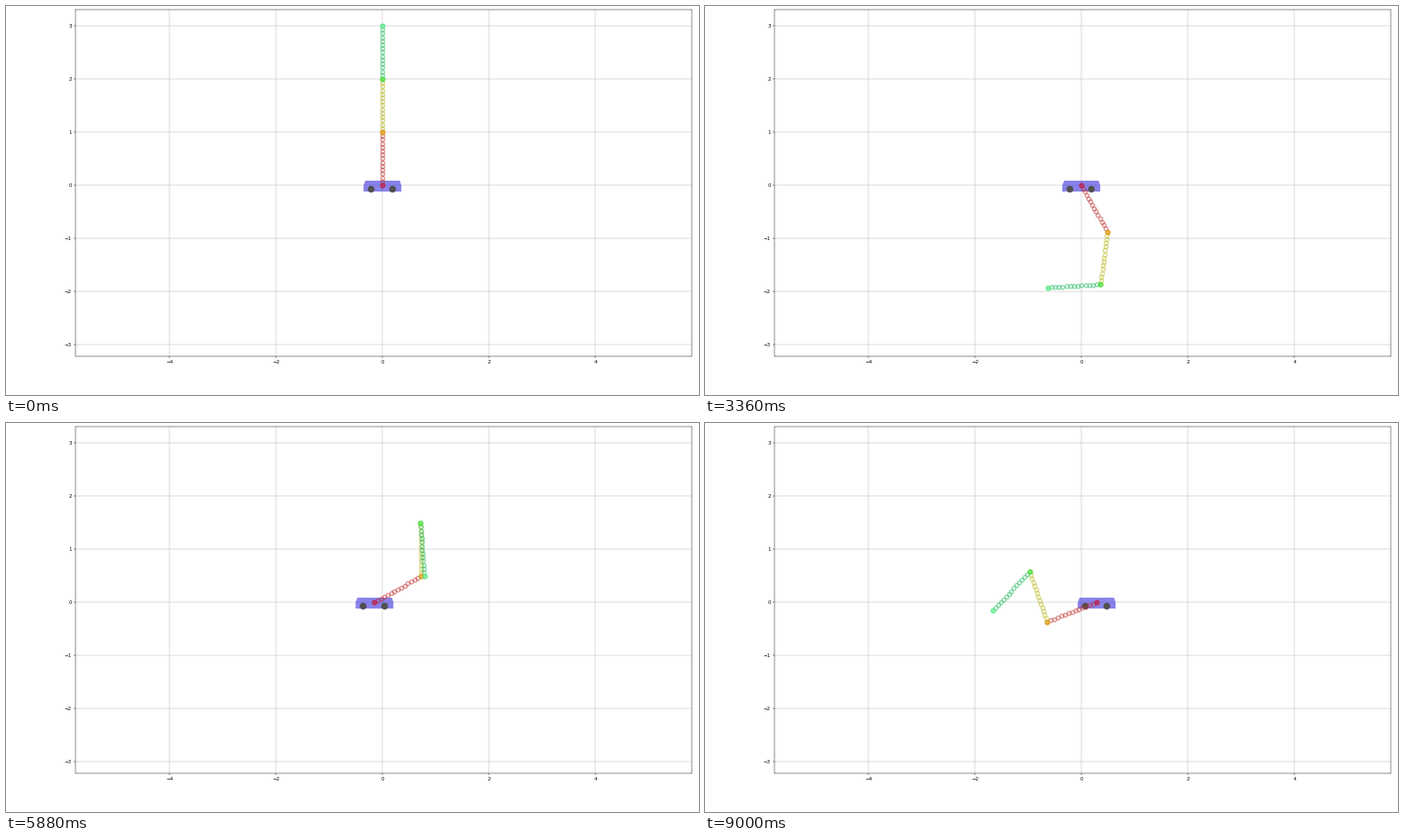
These frames come from a looping animation (768x432 px, 9030 ms). A matplotlib script:

```python
import numpy as np
import matplotlib.pyplot as plt
from matplotlib.animation import FuncAnimation
from matplotlib.patches import Circle, Polygon

FRAMES, STEP = 301, 30      # frame count, ms per frame
SCALE = 59.02               # pixels per unit
ORIGIN = 417.2, 199.0       # stage position of (0, 0) in pixels
PX = 72 / 40                # points per pixel
BEADS = 15                  # rings per link
MASS, DRIFT = 13, 0.003     # cart mass in bobs, slow drift of the whole

# turning points of the swing: seconds, then link angles in degrees
# clockwise from upright
TIMES, *ANGLES = np.transpose([
    (0, 0, 0, 0), (0.7, 40, -38, 18), (1.11, 218.5, -238.5, -40.5),
    (1.75, 110, -230, -160), (2.37, 257.3, -35.7, -20.3),
    (3.05, 195, -100, -40), (3.72, 105, -270, -180),
    (4.35, 90, -409.1, -366.8), (5, 175, -520, -480),
    (5.88, 60.9, -720.5, -544), (6.3, 140, -855, -505),
    (7.11, 79.7, -949.8, -270), (8.25, -90, -1170, -490),
    (8.6, -170, -1280, -580), (9, -111.5, -1459.4, -857),
])
ANGLES = np.radians(ANGLES).T
SPEEDS = np.gradient(ANGLES, TIMES, axis=0)
SPEEDS[0] = 0               # released at rest


def angles_at(t):
    """Cubic Hermite curve through the turning points."""
    i = np.clip(np.searchsorted(TIMES, t, side="right") - 1, 0, len(TIMES) - 2)
    h = TIMES[i + 1] - TIMES[i]
    u = (t - TIMES[i]) / h
    v = 1 - u
    return (v * v * ((1 + 2 * u) * ANGLES[i] + u * h * SPEEDS[i])
            + u * u * ((1 + 2 * v) * ANGLES[i + 1] - v * h * SPEEDS[i + 1]))


def joints_at(t):
    """Pivot and bobs; the cart recoils so that momentum is kept."""
    a = angles_at(t)
    bobs = np.cumsum(np.sin(a))
    cart = DRIFT * t - bobs.sum() / (MASS + len(a))
    return cart + np.append(0, bobs), np.append(0, np.cumsum(np.cos(a)))


fig = plt.figure(figsize=(19.2, 10.8), dpi=40, facecolor="white")
ax = fig.add_axes([0.1, 0.1, 0.89, 0.89])
ax.set_xlim((0.1 * 768 - ORIGIN[0]) / SCALE, (0.99 * 768 - ORIGIN[0]) / SCALE)
ax.set_ylim((ORIGIN[1] - 0.9 * 432) / SCALE, (ORIGIN[1] - 0.01 * 432) / SCALE)
ax.set_xticks(range(-4, 5, 2))
ax.set_yticks(range(-3, 4))
ax.grid(True)
ax.set_axisbelow(True)

BODY = np.array([(-0.355, -0.12), (-0.355, 0), (-0.32, 0.085),
                 (0.325, 0.085), (0.355, 0), (0.355, -0.12)])
AXLES = -0.213, 0.19
body = ax.add_patch(Polygon(BODY, fc="#4a42de", ec="none", alpha=0.66, zorder=3))
wheels = [ax.add_patch(Circle((0, -0.075), 0.064, fc="#505050", ec="none", zorder=4))
          for _ in AXLES]


def dots(color, size, edge, face, alpha, z):
    return ax.plot([], [], "o", ms=size * PX, mew=edge * PX, mec=color,
                   mfc=face, alpha=alpha, zorder=z)[0]


links = [dots(c, 4.2, 1.5, "none", 0.5, 5 + i)
         for i, c in enumerate(("#c03030", "#b8b81e", "#24bc60"))]
joints = [dots(c, 4.8, 1.2, c, 0.65, 8)
          for c in ("#c41c48", "#e8a010", "#4ce83c", "#5cf08c")]


def draw(frame):
    x, y = joints_at(frame * STEP / 1000)
    body.set_xy(BODY + (x[0], 0))
    for wheel, dx in zip(wheels, AXLES):
        wheel.center = x[0] + dx, -0.075
    for i, link in enumerate(links):
        link.set_data(np.linspace(x[i], x[i + 1], BEADS),
                      np.linspace(y[i], y[i + 1], BEADS))
    for joint, px, py in zip(joints, x, y):
        joint.set_data([px], [py])
    return [body, *wheels, *links, *joints]


anim = FuncAnimation(fig, draw, frames=FRAMES, interval=STEP,
                     repeat=True, repeat_delay=0, blit=False)
plt.show()
```
